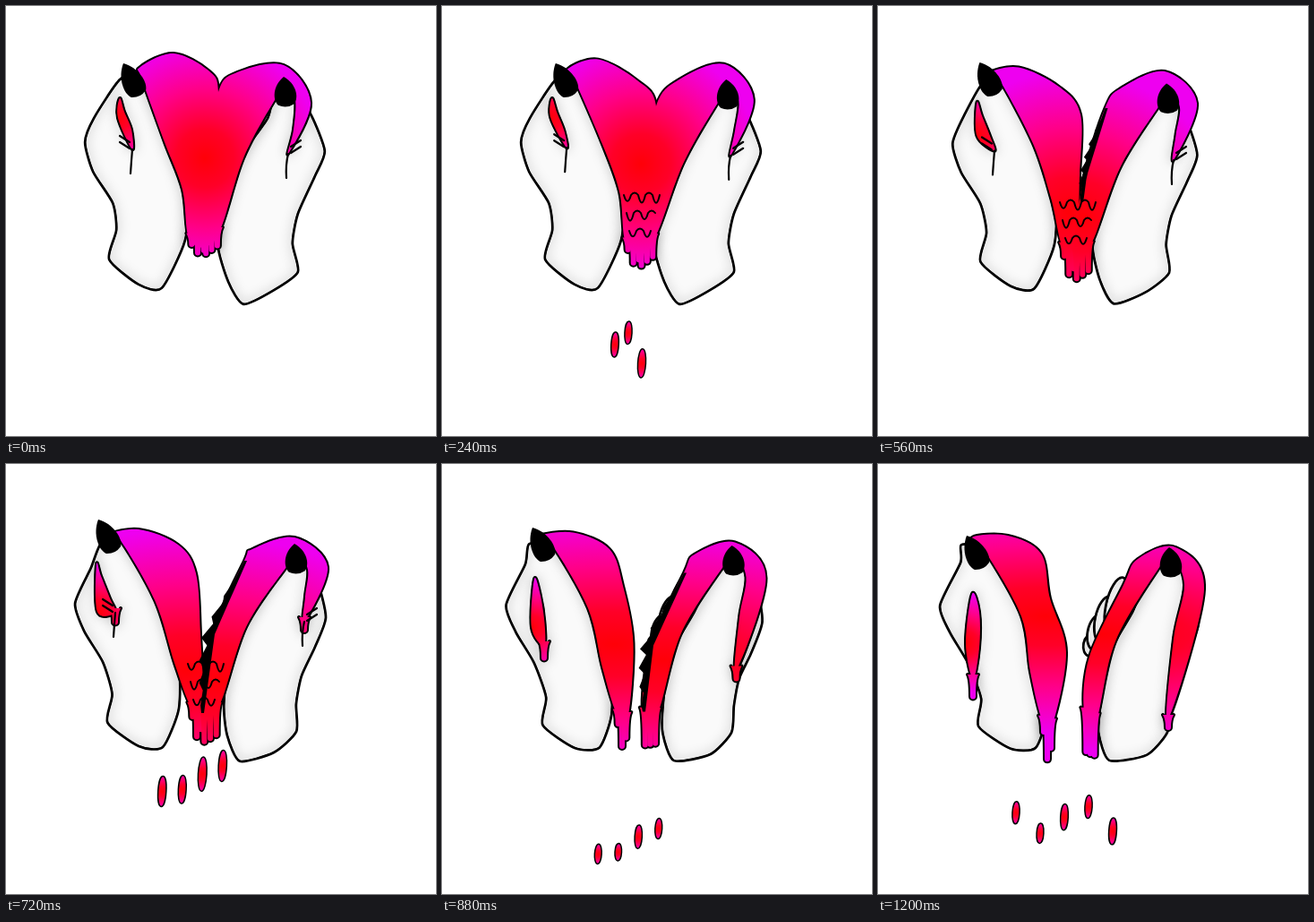
Recreate the animation shown at these times as an HTML page with a canvas. Size 480 px wide and 480 px high, loop 1.28 s.

```html
<!DOCTYPE html>
<html lang="en">
<head>
<meta charset="utf-8">
<title>Melting heart</title>
<style>
  html, body { margin: 0; width: 100%; height: 100%; overflow: hidden; background: #fff; }
  canvas { display: block; width: 100vw; height: 100vh; }
</style>
</head>
<body>
<canvas id="stage" width="480" height="480"></canvas>
<script>
const ctx = document.getElementById('stage').getContext('2d');
const STEP = 80, STEPS = 16;

// Each shape lists its key outlines; a hand goes from closed to open.
const KEYS = [0, 5, 9, 13];
const leftHand = [
  '127,82 98,125 88,152 97,185 119,220 123,250 115,283 148,311 174,315 200,262 203,210 185,152 170,118 150,78',
  '93,90 92,110 69,158 80,188 100,222 115,262 112,293 148,318 176,317 188,282 186,230 172,180 155,135 122,95'
].map(parse);
const rightHand = [
  '322,95 341,122 356,162 345,190 326,232 320,265 326,297 298,318 265,333 248,308 236,265 243,205 266,162 292,125 300,97',
  '336,105 352,135 358,178 345,215 333,240 327,270 323,300 300,325 258,331 246,300 248,270 256,215 284,165 298,130 314,108'
].map(parse);
const leftHeart = [
  '150,68 187,53 226,72 237,96 231,170 224,262 204,258 197,205 177,152 152,82',
  '135,71 166,64 212,90 240,120 233,190 222,275 205,265 199,210 180,155 145,82',
  '110,79 148,73 192,90 212,122 217,190 220,276 206,270 188,222 166,152 124,80',
  '105,82 145,80 182,100 192,150 210,210 195,290 183,285 170,232 160,170 120,98'
].map(parse);
const rightHeart = [
  '237,96 258,74 310,66 340,108 315,165 321,138 323,105 313,90 300,105 265,170 239,250 220,262 227,170',
  '241,120 268,88 318,64 353,102 327,168 331,140 337,108 325,95 312,112 272,180 238,262 219,275 230,190',
  '266,108 275,95 322,82 359,115 333,176 334,148 337,118 325,100 313,115 268,182 238,270 218,278 230,190',
  '274,135 290,106 332,93 364,140 324,285 330,195 342,135 328,104 315,114 265,198 244,285 230,275 236,215'
].map(parse);
const sliver = [
  '127,103 125,125 141,160 140,138 132,118',
  '120,103 119,125 138,157 134,140 126,120',
  '101,112 102,165 122,166 116,150 106,125',
  '105,145 98,200 106,240 113,205 113,165'
].map(parse);

function parse(s) { return s.split(' ').map(p => p.split(',').map(Number)); }
const mix = (a, b, t) => a + (b - a) * t;
const mixPoint = (a, b, t) => [mix(a[0], b[0], t), mix(a[1], b[1], t)];
const mixShape = (a, b, t) => a.map((p, i) => mixPoint(p, b[i], t));
const clamp = v => Math.min(1, Math.max(0, v));
const smooth = v => v * v * (3 - 2 * v);
const rnd = i => { const v = Math.sin(i * 12.99 + 4) * 43758.5; return v - Math.floor(v); };

function pose(shapes, step) {
  const i = KEYS.findLastIndex(k => k <= step);
  if (i === KEYS.length - 1) return shapes[i];
  return mixShape(shapes[i], shapes[i + 1], (step - KEYS[i]) / (KEYS[i + 1] - KEYS[i]));
}

// Closed spline through the points; a larger tension gives sharper corners.
function blob(p, tension = 6) {
  const n = p.length, path = new Path2D();
  path.moveTo(...p[0]);
  for (let i = 0; i < n; i++) {
    const [a, b, c, d] = [i + n - 1, i, i + 1, i + 2].map(j => p[j % n]);
    path.bezierCurveTo(b[0] + (c[0] - a[0]) / tension, b[1] + (c[1] - a[1]) / tension,
      c[0] - (d[0] - b[0]) / tension, c[1] - (d[1] - b[1]) / tension, ...c);
  }
  path.closePath();
  return path;
}

function outline(path, width = 2.4) {
  ctx.lineWidth = width;
  ctx.strokeStyle = '#000';
  ctx.stroke(path);
}

function shade(area, edge) {
  ctx.save();
  ctx.clip(area);
  ctx.shadowColor = 'rgba(0,0,0,.35)';
  ctx.shadowBlur = 13;
  outline(edge, 3);
  ctx.restore();
}

function drawSkin(path) {
  ctx.fillStyle = '#fafafa';
  ctx.fill(path);
  shade(path, path);
  outline(path);
}

function paint(path, [x, y], r, stretch = 1) {
  ctx.save();
  ctx.clip(path);
  ctx.translate(x, y);
  ctx.scale(stretch, 1);
  const g = ctx.createRadialGradient(0, 0, 0, 0, 0, r);
  g.addColorStop(0, '#ff0008');
  g.addColorStop(.25, '#ff0028');
  g.addColorStop(.6, '#ff0088');
  g.addColorStop(1, '#ee00f0');
  ctx.fillStyle = g;
  ctx.fillRect(-480, -480, 960, 960);
  ctx.restore();
}

// A run of goo: wide where it leaves the heart, round at its end.
function drip([x, y], len, w) {
  const path = new Path2D(), r = w / 2;
  path.moveTo(x - w, y - 5);
  path.quadraticCurveTo(x - r, y, x - r, y + len - r);
  path.arc(x, y + len - r, r, Math.PI, 0, true);
  path.quadraticCurveTo(x + r, y, x + w, y - 5);
  return path;
}

const drips = (from, to, seed, step) => [0, 1, 2].map(i =>
  drip(mixPoint(from, to, (i + .5) / 3), 8 + (12 + 2 * step) * rnd(seed + i), 6));

function drawDrop(x, y, h) {
  const path = new Path2D();
  path.ellipse(x, y, 2 + h / 18, h / 2, .06, 0, 7);
  outline(path, 3);
  paint(path, [x, y], h * .7);
}

// Three showers, each wider than the one before.
function drawDrops(step) {
  [1, 8, 12.5].forEach((start, n) => {
    const age = step - start;
    if (age <= 0 || age > 3.5) return;
    for (let i = 0; i < 3 + n; i++) {
      const x = 208 + ((i + .5) / (3 + n) - .5) * 45 * (n + 1);
      drawDrop(x, 285 + 35 * age + 50 * rnd(i + 5 * n), 34 - 6 * age + 10 * rnd(i));
    }
  });
}

function drawNail([x, y], dx, dy) {
  const len = Math.hypot(dx, dy);
  ctx.save();
  ctx.translate(x, y);
  ctx.rotate(Math.atan2(dy, dx));
  ctx.fillStyle = '#000';
  ctx.beginPath();
  ctx.moveTo(len, 0);
  ctx.bezierCurveTo(len * .6, 13, -2, 15, -9, 9);
  ctx.quadraticCurveTo(-14, 0, -9, -9);
  ctx.bezierCurveTo(-2, -15, len * .6, -13, len, 0);
  ctx.fill();
  ctx.restore();
}

function drawFingers() {
  for (let i = 3; i >= 0; i--) {
    const path = new Path2D();
    path.ellipse(267 - 15 * i + 1.8 * i * i, 160 + 14 * i, 13 - 1.3 * i, 34 - 7 * i, .2, 0, 7);
    drawSkin(path);
  }
}

// Jagged dark gap that runs down the inner edge of the right half.
function drawCrack(heart, step) {
  const depth = clamp((step - 3) / 6), n = 14;
  const [top, mid, end] = [heart[0], heart.at(-1), heart.at(-2)];
  const edge = t => t < .5 ? mixPoint(top, mid, t * 2) : mixPoint(mid, end, t * 2 - 1);
  ctx.fillStyle = '#000';
  ctx.beginPath();
  for (let i = 0; i <= n; i++) {
    const [x, y] = edge(i / n * depth);
    ctx.lineTo(x - (i % 2 ? 12 : 4) * Math.sin(Math.PI * i / n) * depth, y + i % 2 * 4);
  }
  for (let i = n; i >= 0; i--) {
    const [x, y] = edge(i / n * depth);
    ctx.lineTo(x + 3, y);
  }
  ctx.fill();
}

// Wavy rims of the goo, row under row.
function drawCurls(y) {
  for (let row = 0; row < 3; row++) {
    const path = new Path2D();
    path.moveTo(203 + row * 3, y + row * 20);
    for (let i = 0; i < 5 - row; i++) {
      const sag = i % 2 ? -5 : 10 + 8 * rnd(row * 5 + i);
      path.quadraticCurveTo(207 + row * 3 + i * 8, y + row * 20 + sag, 211 + row * 3 + i * 8, y + row * 20);
    }
    outline(path, 2);
  }
}

function drawCrease([x, y], side) {
  const path = new Path2D();
  path.moveTo(x, y);
  path.quadraticCurveTo(x - 2 - side, y + 12, x - 2, y + 27);
  for (const k of [0, 7]) {
    path.moveTo(x + side * 3, y - 8 + k);
    path.lineTo(x + side * 14, y - 15 + k);
  }
  outline(path, 2.2);
}

function draw(step) {
  const melt = smooth(clamp((step - 4) / 9));
  const sink = Math.sin(Math.PI * step / STEPS) ** 4;
  const hands = [leftHand, rightHand].map(([a, b]) => blob(mixShape(a, b, melt), 9));
  const [left, right, side] = [leftHeart, rightHeart, sliver].map(s => pose(s, step));

  ctx.fillStyle = '#fff';
  ctx.fillRect(0, 0, 480, 480);
  ctx.lineCap = ctx.lineJoin = 'round';
  if (step > 9) drawFingers();
  hands.forEach(drawSkin);

  const skin = new Path2D();
  hands.forEach(h => skin.addPath(h));
  const glowY = 170 + 65 * sink, size = 130 + 30 * sink;
  const stretch = 1 + 2 * smooth(clamp((step - 7) / 6));
  const glowL = [[222 - 35 * melt, glowY], size, stretch];
  const glowR = [[222 + 28 * melt, glowY + 20 * melt], size, stretch];
  const glowS = [side[1], 55];
  const pieces = [
    [blob(left), glowL], [blob(right), glowR], [blob(side), glowS],
    ...drips(left[6], left[5], 1, step).map(d => [d, glowL]),
    ...drips(right[11], right[10], 4, step).map(d => [d, glowR])
  ];
  if (step > 7) pieces.push([drip(side[2], step * 1.5, 6), glowS], [drip(right[4], 12, 6), glowR]);

  // Outline every piece first, so that fills merge where they meet.
  for (const [path] of pieces) {
    shade(skin, path);
    outline(path, 4);
  }
  for (const [path, glow] of pieces) paint(path, ...glow);

  if (step > 3 && step < 13) drawCrack(right, step);
  if (step > 0 && step < 10) drawCurls(205 + 2 * step);
  if (step < 10) {
    drawCrease(side[2], -1);
    drawCrease(right[4], 1);
  }
  const thumbL = left[9], thumbR = right[7];
  drawNail([thumbL[0] - 8, thumbL[1] + 8], -13, -26);
  drawNail([thumbR[0] - 1, thumbR[1] + 11], -2, -22);
  drawDrops(step);
}

function tick() {
  draw(Math.floor(performance.now() / STEP) % STEPS);
  requestAnimationFrame(tick);
}
tick();
</script>
</body>
</html>
```
